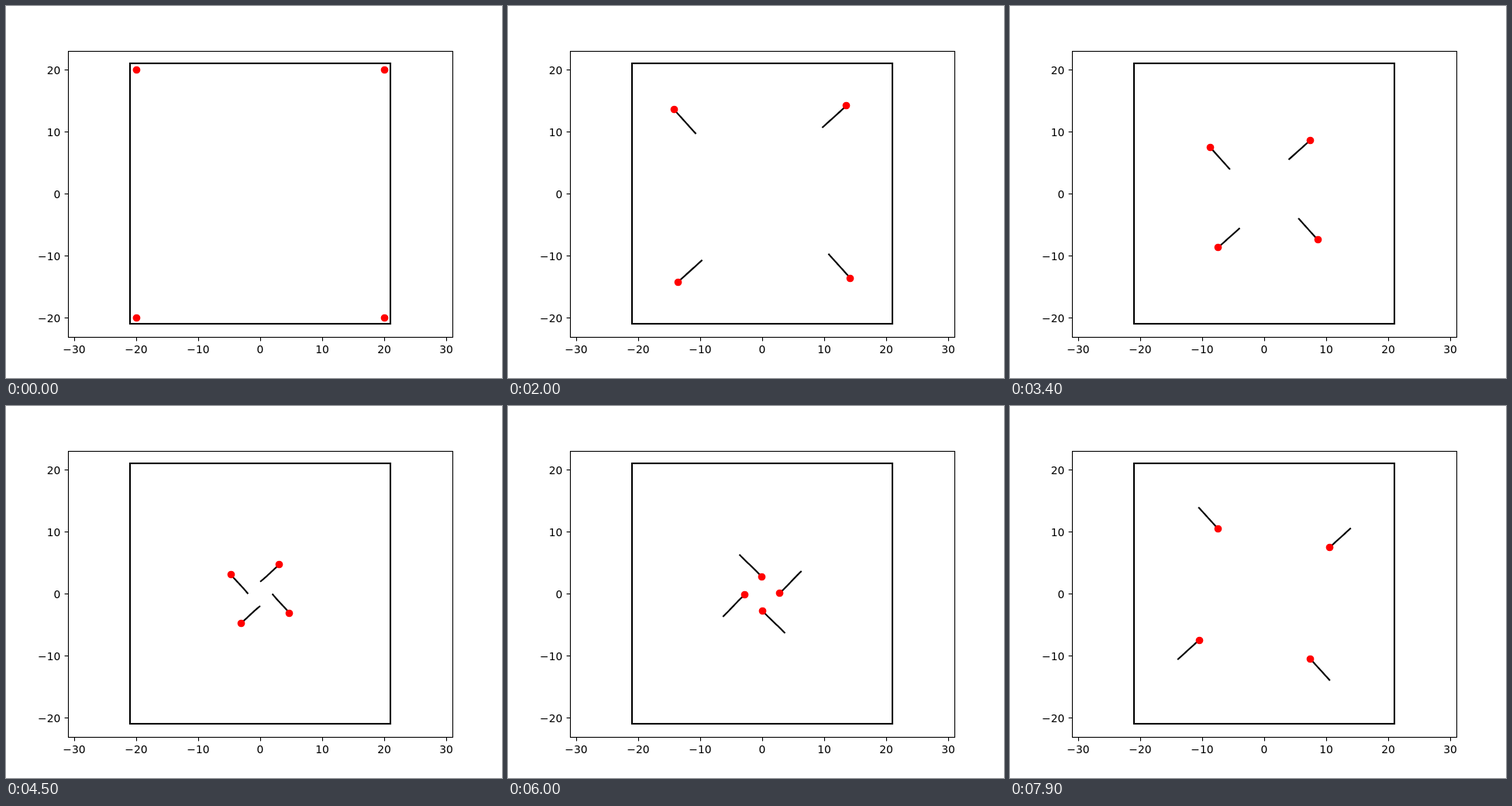
These frames come from a looping animation (640x480 px, 8 s). An HTML page with a canvas:

```html
<!DOCTYPE html>
<html lang="en">
<head>
<meta charset="utf-8">
<title>Four particles in a box</title>
<style>
  html, body { margin: 0; width: 100%; height: 100%; overflow: hidden; background: #fff; }
  canvas { display: block; }
</style>
</head>
<body>
<canvas id="stage" width="640" height="480"></canvas>
<script>
const ctx = document.getElementById('stage').getContext('2d');
const LOOP = 8000, STEP = 100;
const START = 0.63, TRAIL = 0.85; // seconds

// Path of one particle: [time, x, y]; the others are quarter turns of it.
const path = [
  [0.63, -20, 20], [1.8, -15.08, 14.55], [2.7, -11.35, 10.42],
  [3.6, -7.93, 6.63], [4.5, -4.74, 3.08], [5.35, -2.03, 0.1],
  [6, 0.12, -2.8], [6.85, 3.6, -6.25], [7.9, 7.45, -10.5], [8.75, 10.52, -13.88]
];

const px = x => 328 + 8 * x;
const py = y => 242.4 - 8 * y;
const crisp = v => Math.floor(v) + 0.5;

function slope(i, k) {
  const a = path[Math.max(0, i - 1)], b = path[Math.min(path.length - 1, i + 1)];
  return (b[k] - a[k]) / (b[0] - a[0]);
}

// Cubic Hermite interpolation along the path
function position(time) {
  let i = 0;
  while (i < path.length - 2 && time > path[i + 1][0]) i++;
  const a = path[i], b = path[i + 1], h = b[0] - a[0];
  const s = Math.min(1, Math.max(0, (time - a[0]) / h)), r = 1 - s;
  return [1, 2].map(k =>
    r * r * (1 + 2 * s) * a[k] + s * s * (3 - 2 * s) * b[k] +
    h * s * r * (r * slope(i, k) - s * slope(i + 1, k)));
}

function turn([x, y], quarters) {
  for (let q = 0; q < quarters; q++) [x, y] = [-y, x];
  return [x, y];
}

function line(x1, y1, x2, y2) {
  ctx.beginPath();
  ctx.moveTo(x1, y1);
  ctx.lineTo(x2, y2);
  ctx.stroke();
}

function drawAxes() {
  ctx.fillStyle = '#fff';
  ctx.fillRect(0, 0, 640, 480);
  ctx.strokeStyle = ctx.fillStyle = '#000';
  ctx.font = '13.89px "DejaVu Sans", sans-serif';
  ctx.lineCap = 'butt';
  ctx.lineWidth = 1.11;
  ctx.strokeRect(80.5, 58.5, 496, 369);
  const label = v => String(v).replace('-', '\u2212');
  for (let v = -30; v <= 30; v += 10) {
    const x = crisp(px(v));
    line(x, 427.5, x, 432.4);
    ctx.textAlign = 'center';
    ctx.fillText(label(v), px(v), 448);
    if (Math.abs(v) > 20) continue;
    const y = crisp(py(v));
    line(75.6, y, 80.5, y);
    ctx.textAlign = 'right';
    ctx.fillText(label(v), 70.3, y + 5.5);
  }
  ctx.lineWidth = 2.08;
  ctx.strokeRect(160, 74, 336, 336);
}

function drawParticle(time, quarters) {
  const tail = Math.max(START, time), head = time + TRAIL;
  const at = u => turn(position(u), quarters);
  if (time > 0) {
    ctx.lineCap = 'square';
    ctx.beginPath();
    for (let n = 0; n <= 16; n++) {
      const [x, y] = at(tail + (head - tail) * n / 16);
      ctx.lineTo(px(x), py(y));
    }
    ctx.stroke();
  }
  const [x, y] = at(tail);
  ctx.fillStyle = '#f00';
  ctx.beginPath();
  ctx.arc(crisp(px(x)), crisp(py(y)), 4.86, 0, 2 * Math.PI);
  ctx.fill();
}

function draw() {
  const time = Math.floor(performance.now() % LOOP / STEP) * STEP / 1000;
  drawAxes();
  for (let q = 0; q < 4; q++) drawParticle(time, q);
  requestAnimationFrame(draw);
}
draw();
</script>
</body>
</html>
```
